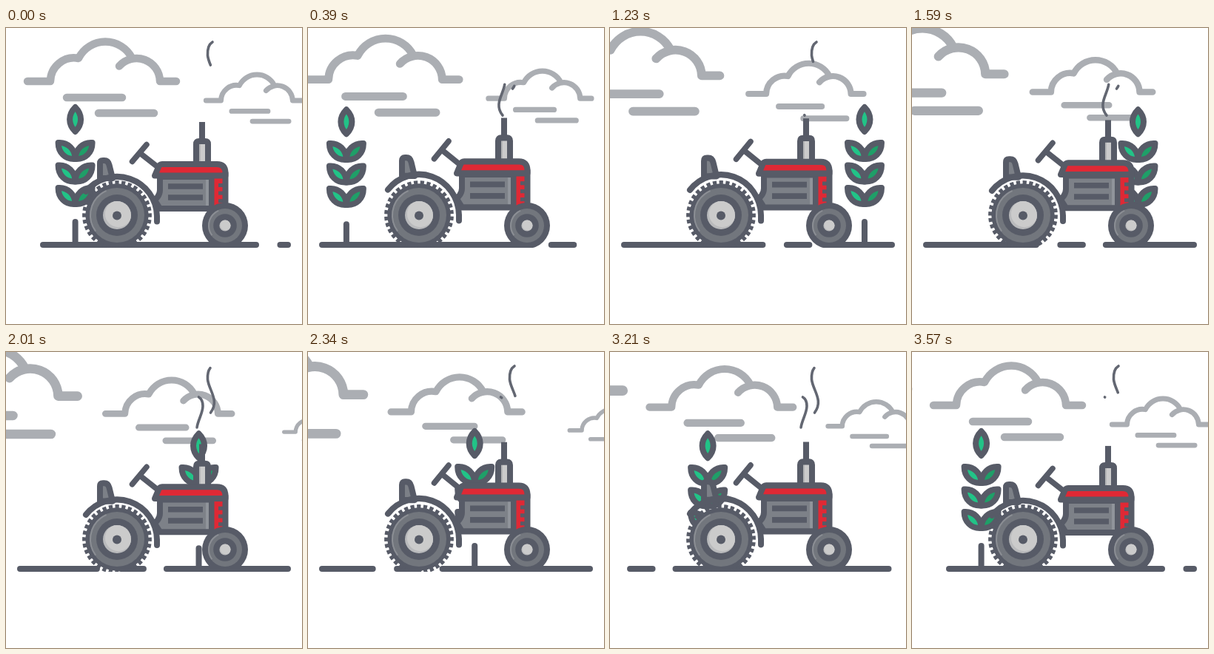
An HTML page with a canvas that plays this animation: 400x400 px, repeating every 3600 ms.

```html
<!DOCTYPE html>
<html lang="en">
<head>
<meta charset="utf-8">
<title>Tractor</title>
<style>
html, body { margin: 0; width: 100%; height: 100%; overflow: hidden; background: #fff; }
canvas { display: block; }
</style>
</head>
<body>
<canvas id="stage" width="400" height="400"></canvas>
<script>
const ctx = document.getElementById('stage').getContext('2d');
const LOOP = 3600, STEP = 30, LAST = LOOP / STEP - 1;
const SCROLL = 382, FLOOR = 297, TAU = Math.PI * 2;
const DARK = '#575b67', GREY = '#72767d', LIGHT = '#cbcbcb', RED = '#df2935';
const CLOUD = '#abaeb3', GREEN = '#22c387', DEEP_GREEN = '#1f9f68';

const clamp = v => Math.max(0, Math.min(1, v));
const ease = v => { v = clamp(v); return v * v * (3 - 2 * v); };
const wave = (t, period) => (1 - Math.cos(TAU * t / period)) / 2;

function stroke(path, width = 8, color = DARK, cap = 'round') {
  ctx.lineWidth = width;
  ctx.strokeStyle = color;
  ctx.lineCap = cap;
  ctx.lineJoin = 'round';
  ctx.stroke(path);
}
function fill(path, color) {
  ctx.fillStyle = color;
  ctx.fill(path);
}
function disc(x, y, r, color) {
  ctx.beginPath();
  ctx.arc(x, y, r, 0, TAU);
  ctx.fillStyle = color;
  ctx.fill();
}
function rect(x, y, w, h, color) {
  ctx.fillStyle = color;
  ctx.fillRect(x, y, w, h);
}
function at(x, y, sx, sy, draw) {
  ctx.save();
  ctx.translate(x, y);
  ctx.scale(sx, sy);
  draw();
  ctx.restore();
}

// Clouds drift left while growing; coordinates are relative to the base line.
const cloud = new Path2D(`M-100.5 0H-69.5A32 32 0 0 1-31.5-31A40.5 40.5 0 0 1 41-31
  M23.5-20.5A31.5 31.5 0 0 1 78.5 0H100.5M-47.5 22H27.5M-4.5 43H70.5`);
function drawCloud(q) {
  const x = q < 1 ? 336 - 206.5 * q : 129.5 - 271.5 * (q - 1);
  const y = q < 0 ? 98 - 23 * q : q < 1 ? 98 - 26 * q : 72 - 22 * (q - 1);
  const size = 0.654 + 0.346 * q;
  at(x, y, size, size, () => stroke(cloud, 10.5, CLOUD));
}

function makeSmoke(d, delay) {
  const el = document.createElementNS('http://www.w3.org/2000/svg', 'path');
  el.setAttribute('d', d);
  return { path: new Path2D(d), length: el.getTotalLength(), delay };
}
const smokes = [
  makeSmoke('M263 118C250 102 266 88 266 73C266 67 264 63 260.5 61', 0),
  makeSmoke('M276.5 82C289 65 274 52 272.5 37C272 28 274 22 279 19', 300)
];
function drawSmoke({ path, length, delay }, t) {
  const phase = (t - delay + 1200) % 1200;
  const head = ease(phase / 600), tail = ease((phase - 600) / 600);
  if (head <= tail) return;
  ctx.setLineDash([(head - tail) * length, length * 2]);
  ctx.lineDashOffset = -tail * length;
  stroke(path, 3.6, '#636772');
  ctx.setLineDash([]);
}

const bud = new Path2D('M0 107C-10 117-10 130 0 140C10 130 10 117 0 107Z');
const leaf = new Path2D('M0 177C-14 178-23 168-23 155C-10 154 0 164 0 177Z');
function drawPlant(x, bob) {
  at(x, bob, 1, 1, () => {
    fill(bud, GREEN);
    stroke(bud);
  });
  stroke(new Path2D(`M${x} ${262 + bob}V293`));
  for (let row = 0; row < 3; row++) {
    for (const side of [1, -1]) {
      at(x, row * 30.5 + bob * 0.3, side, 1, () => {
        fill(leaf, side > 0 ? GREEN : DEEP_GREEN);
        stroke(leaf);
      });
    }
  }
}

function drawGround(shift) {
  for (const [from, to] of [[50, 338], [370.5, 401]]) {
    for (const lap of [0, SCROLL]) {
      const a = Math.max(19, from - shift + lap);
      const b = Math.min(381, to - shift + lap);
      if (a < b) stroke(new Path2D(`M${a} 293H${b}`));
    }
  }
}

const seat = new Path2D('M127 203V183Q127 179 131 179H133Q138 179 139.5 185L144 203Z');
const steering = new Path2D('M170.5 180.5L190 157.5M181 169L206.5 189');
const engine = new Path2D('M208 201V219Q208 224 205 228L201 233L208 244H278V201Z');
const hood = new Path2D('M201 199.5L206 188Q207.5 184 211 184H285Q296.5 184 296.5 196V199.5Z');
const muffler = new Path2D('M257 187V157Q257 153 261 153H269Q273 153 273 157V187Z');
const vents = new Path2D('M219 214H266M219 229H266');
const fender = new Path2D('M108 221A54 54 0 0 1 204 254V261.5');

function drawBody(t) {
  const stretch = 1 + 0.034 * wave(t, 900);
  at(0, FLOOR * (1 - stretch), 1, stretch, () => {
    fill(seat, '#7c8087');
    stroke(seat);
    stroke(steering, 7.5);
    rect(261, 127, 8, 28, DARK);
    fill(muffler, LIGHT);
    rect(260, 156, 3, 28, '#b4b5b7');
    stroke(muffler);

    fill(engine, '#7d8188');
    rect(270, 203, 4, 38, '#90949a');
    stroke(engine);
    stroke(vents, 7.5, DARK, 'butt');
    rect(281.5, 202, 13, 40, RED);
    for (let i = 0; i < 3; i++) rect(287, 210 + 10.6 * i, 8, 5, DARK);
    stroke(new Path2D('M296.5 196V243'));
    fill(hood, RED);
    stroke(hood);
    stroke(fender);
  });
}

function drawTyre(x, y, [outer, grey, inner, hub]) {
  disc(x, y, outer, DARK);
  disc(x, y, grey, GREY);
  ctx.beginPath();
  ctx.arc(x, y, grey - 1, 2.5, 4.3);
  ctx.lineWidth = 2;
  ctx.strokeStyle = '#8b8e94';
  ctx.lineCap = 'butt';
  ctx.stroke();
  disc(x, y, inner, DARK);
  disc(x, y, hub, '#b9babc');
  ctx.save();
  ctx.beginPath();
  ctx.arc(x, y, hub, 0, TAU);
  ctx.clip();
  disc(x + hub * 0.1, y - hub * 0.1, hub * 0.95, LIGHT);
  ctx.restore();
}

function drawWheels(p) {
  const teeth = 32, pitch = TAU / teeth, width = pitch * 0.6;
  ctx.save();
  ctx.beginPath();
  ctx.rect(0, 0, 400, FLOOR);
  ctx.clip();
  ctx.lineWidth = 5;
  ctx.lineCap = 'butt';
  ctx.strokeStyle = DARK;
  for (let i = 0; i < teeth; i++) {
    const a = i * pitch + TAU * p - width / 2;
    ctx.beginPath();
    ctx.arc(150, 253, 44.4, a, a + width);
    ctx.stroke();
  }
  drawTyre(150, 253, [42.7, 37, 28, 19]);
  disc(150, 253.5, 6, DARK);
  drawTyre(296, 267, [31, 23, 15.8, 7.6]);
  ctx.restore();
}

function draw(now) {
  const frame = Math.floor((now % LOOP) / STEP);
  const t = frame * STEP, p = frame / LAST, shift = SCROLL * p;
  rect(0, 0, 400, 400, '#fff');
  for (const lap of [-1, 0, 1]) drawCloud(p + lap);
  const bob = 4.5 * wave(t, 1200);
  drawPlant(93.6 - shift, bob);
  drawPlant(93.6 - shift + SCROLL, bob);
  drawGround(shift);
  for (const smoke of smokes) drawSmoke(smoke, t);
  drawBody(t);
  drawWheels(p);
}

function tick() {
  draw(performance.now());
  requestAnimationFrame(tick);
}
tick();
</script>
</body>
</html>
```
